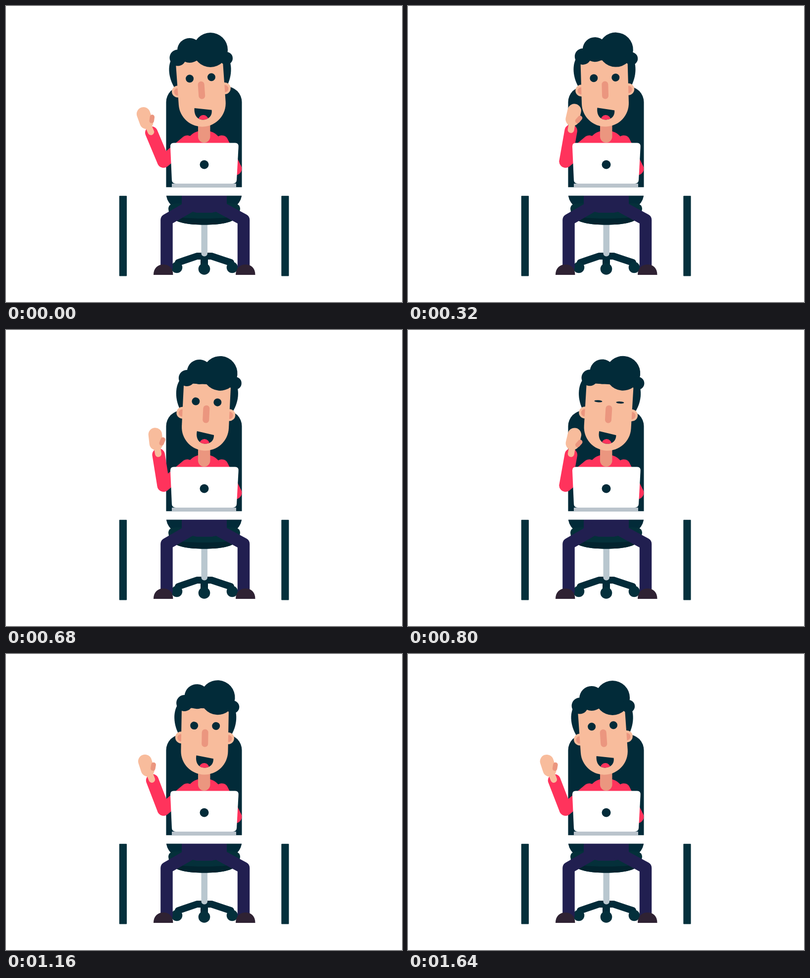
An HTML page for the animation above (1.68 s loop, 800 px wide and 600 px high).

```html
<!DOCTYPE html>
<html lang="en">
<head>
<meta charset="utf-8">
<title>Waving at the desk</title>
<style>
  html, body { margin: 0; height: 100%; overflow: hidden; background: #fff; }
  svg { display: block; width: 800px; height: 600px; }
  .dark { fill: #022b39; }
  .leg { fill: #04303c; }
  .skin { fill: #f8bc9c; }
  .shade { fill: #eb967f; }
  .red { fill: #ff335c; }
  .shoe { fill: #2f2233; }
  .line { fill: none; stroke-linecap: round; stroke-linejoin: round; }
  .sleeve { stroke: #ff335c; stroke-width: 25.6; }
  .pants { stroke: #211f50; stroke-width: 24.5; }
</style>
</head>
<body>
<svg viewBox="0 0 800 600">
  <defs>
    <path id="mouth" d="M383.7 205.8L418.3 212C419 224 411 230.5 400.5 230.5C389 230.5 381.5 221 383.7 205.8Z"/>
    <clipPath id="inMouth"><use href="#mouth"/></clipPath>
    <path id="shoe" d="M298 545C298 531 307 524 318 524S337.5 531 337.5 545Z"/>
  </defs>

  <!-- chair -->
  <rect class="dark" x="323.5" y="163" width="153" height="249" rx="32"/>
  <path class="line" stroke="#022b39" stroke-width="14" d="M348 520L386 507H415L454 520"/>
  <rect class="dark" x="393" y="504" width="15" height="24"/>
  <g class="leg">
    <circle cx="345" cy="530" r="11.3"/>
    <circle cx="400.5" cy="533" r="11.8"/>
    <circle cx="457" cy="530" r="11.3"/>
  </g>
  <rect x="394.5" y="430" width="12.5" height="77.5" rx="6" fill="#b9c7cf"/>
  <path fill="#04303a" d="M328 411Q328 400 345 400H456Q473 400 473 411L471 424C461 440 431 443.5 400.5 443.5S340 440 330 424Z"/>
  <path fill="#02242f" d="M330 424C346 433 455 433 471 424C461 440 431 443.5 400.5 443.5S340 440 330 424Z"/>

  <!-- legs -->
  <path fill="#211f50" d="M355 380H446V412L416 419H385L355 412Z"/>
  <path class="line pants" d="M380 401.5L324.5 433.5V530M421 401.5L480 433.5V530"/>
  <use href="#shoe" class="shoe"/>
  <use href="#shoe" class="shoe" x="166"/>

  <!-- table -->
  <rect x="229" y="367.3" width="343" height="17.2" fill="#fff"/>
  <rect class="leg" x="228.8" y="384.7" width="15.2" height="162.8" rx="1"/>
  <rect class="leg" x="556.3" y="384.7" width="15.2" height="162.8" rx="1"/>

  <!-- body -->
  <path class="red" d="M358 290C367 262 380 252.5 400 252.5S433 262 442 290Z"/>
  <path class="line sleeve" d="M318.5 315L366 275M436 275L463.5 330"/>
  <rect class="shade" x="388" y="230" width="24.5" height="47" rx="12.2"/>

  <g id="arm">
    <path class="line sleeve" d="M318.2 315L318.5 252"/>
    <path class="line" stroke="#f8bc9c" stroke-width="13" d="M318.2 230V250"/>
    <path class="line" stroke="#f8bc9c" stroke-width="27.5" d="M318.5 210.6L317.5 228.5"/>
    <path class="line" stroke="#eb967f" stroke-width="9.5" d="M332.3 223.3L328.3 230"/>
  </g>

  <!-- laptop -->
  <path fill="#fff" d="M339 277.5H463Q470 277.5 469.7 285L466 353Q465.5 360 458 360H343Q335.5 360 335 353L332 285Q331.7 277.5 339 277.5Z"/>
  <rect x="335" y="360" width="130" height="7.3" fill="#bac4cc"/>
  <circle class="dark" cx="400.5" cy="321.5" r="9"/>

  <!-- head -->
  <g id="face">
    <path class="dark" d="M347 100C334 115 335 145 350 168H451C466 145 467 115 454 100Z"/>
    <g class="skin"><circle cx="352.5" cy="170" r="12"/><circle cx="447.5" cy="170" r="12"/></g>
    <g class="shade"><circle cx="352.5" cy="170.5" r="7.5"/><circle cx="447.5" cy="170.5" r="7.5"/></g>
    <path class="skin" d="M352.5 110H447.5V197A47.5 47.5 0 0 1 352.5 197Z"/>
    <g class="dark">
      <ellipse class="eye" cx="378.3" cy="145.5" rx="8"/>
      <ellipse class="eye" cx="422.3" cy="145.5" rx="8"/>
    </g>
    <rect class="shade" x="394" y="152.5" width="13" height="36" rx="6.5"/>
    <use href="#mouth" class="dark"/>
    <circle class="red" cx="400" cy="231" r="10" clip-path="url(#inMouth)"/>
  </g>
  <g id="hair" class="dark">
    <circle cx="347" cy="105" r="16.5"/>
    <circle cx="371" cy="90" r="25"/>
    <circle cx="413" cy="89" r="35"/>
    <circle cx="445" cy="106" r="13"/>
  </g>
</svg>
<script>
  const LOOP = 1680, WAVE = 560;
  const arm = document.getElementById('arm');
  const face = document.getElementById('face');
  const hair = document.getElementById('hair');
  const eyes = document.querySelectorAll('.eye');

  // 0 -> 1 -> 0 over one period
  const swing = (t, period) => (1 - Math.cos(2 * Math.PI * t / period)) / 2;
  const move = (el, value) => el.setAttribute('transform', value);

  function draw(now) {
    const t = now % LOOP;
    const tilt = swing(t, LOOP);

    move(arm, `rotate(${-23 + 34.5 * swing(t, WAVE)} 318.2 315)`);
    move(face, `rotate(${-4 + 7.4 * tilt} 400 250)`);
    move(hair, `translate(${21.4 * tilt} ${-1.2 * tilt}) rotate(${6 * tilt} 413 89)`);

    // blink at the far end of the tilt
    const open = Math.min(1, Math.max(0, (Math.abs(t - LOOP / 2) - 40) / 120));
    eyes.forEach(e => e.setAttribute('ry', 2.1 + 5.9 * open));

    requestAnimationFrame(draw);
  }
  requestAnimationFrame(draw);
</script>
</body>
</html>
```
